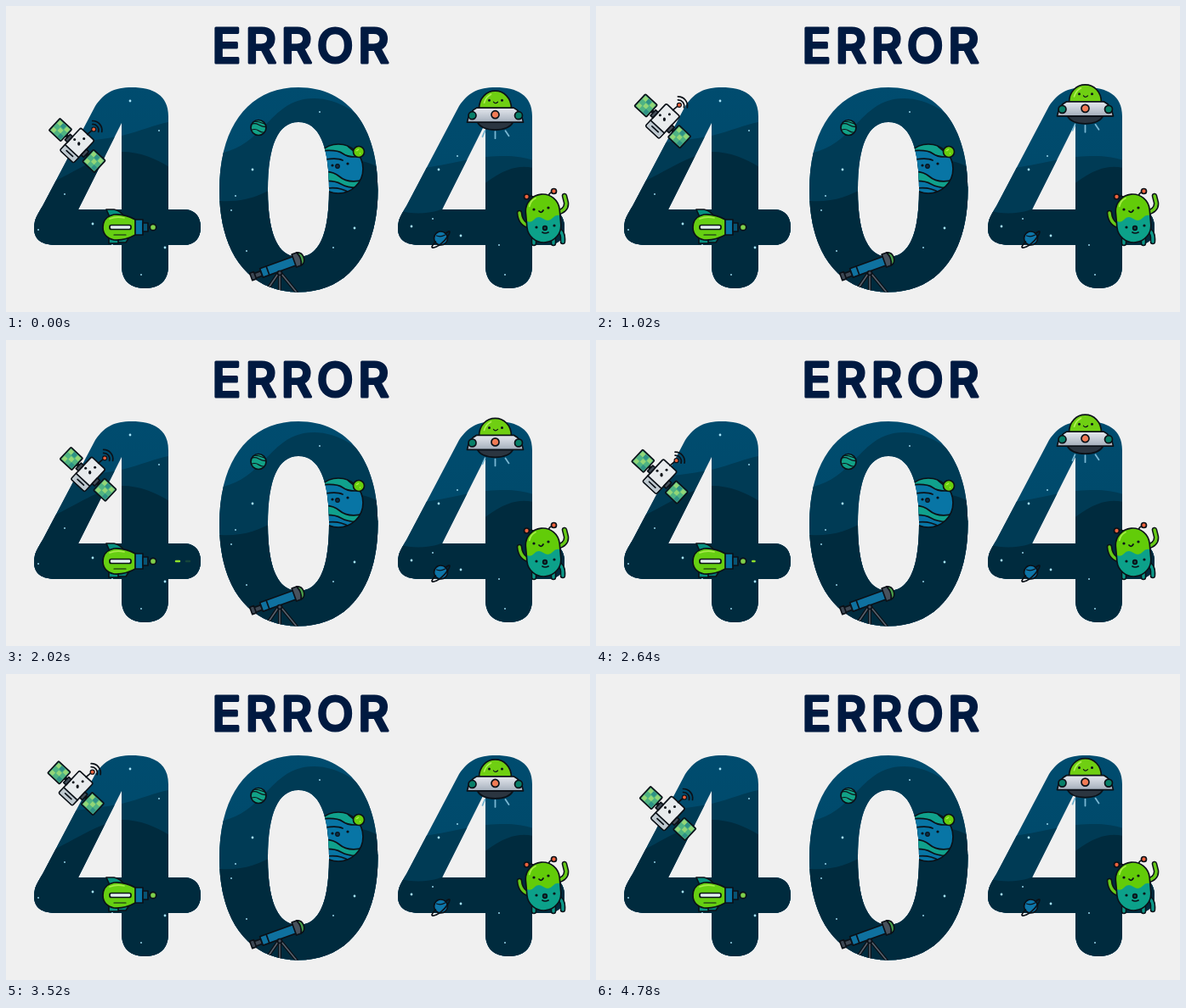
An HTML page that plays this animation: 687 by 361 pixels, repeating every 4.8 s.

```html
<!DOCTYPE html>
<html lang="en">
<head>
<meta charset="utf-8">
<title>Error 404</title>
<style>
  html, body { margin: 0; width: 100%; height: 100%; overflow: hidden; background: #f0f0f0; }
  svg { display: block; width: 100vw; height: 100vh; }
  .title { font: 500 56px Inter, "Open Sans", sans-serif; letter-spacing: 5.6px; fill: #001a41; stroke: #001a41; stroke-width: 3.2; stroke-linejoin: round; }
  .ink { stroke: #0b1118; stroke-width: 1.7; stroke-linejoin: round; stroke-linecap: round; }
  .line { fill: none; }
  .thin { stroke-width: 1.2; }
  .dot { stroke: none; fill: #0b1118; }
</style>
</head>
<body>
<svg viewBox="0 0 687 361" xmlns="http://www.w3.org/2000/svg">
  <defs>
    <path id="four" d="M148 96C173 96 191 105 191 130V240H209C222 240 229 248 229 261S222 282 209 282H191V306C191 324 181 333 163.500 333S136 324 136 306V282H60C42 282 33 276 33 262C33 252 37 246 43 236L105 118C116 102 127 96 148 96ZM136 138L85 240H136Z"/>
    <path id="zero" d="M344 96C403 96 437.500 143 437.500 217S403 337.500 344 337.500S251 291 251 217S285 96 344 96ZM344 137C320 137 308 165 308 217S320 296 344 296S380 270 380 217S368 137 344 137Z"/>
    <clipPath id="digits">
      <use href="#four" clip-rule="evenodd"/>
      <use href="#zero" clip-rule="evenodd"/>
      <use href="#four" x="428" clip-rule="evenodd"/>
    </clipPath>
    <clipPath id="zeroClip"><use href="#zero" clip-rule="evenodd"/></clipPath>
    <clipPath id="globe"><circle cx="391" cy="192" r="29"/></clipPath>
    <clipPath id="ball"><circle cx="297" cy="143.500" r="9"/></clipPath>
    <clipPath id="torso"><rect x="612" y="222" width="40" height="57" rx="20"/></clipPath>
    <linearGradient id="light" x2="0" y2="1"><stop stop-color="#004c6f"/><stop offset="1" stop-color="#004766"/></linearGradient>
    <linearGradient id="hull" x2="0" y2="1"><stop stop-color="#e6e9ef"/><stop offset="1" stop-color="#a4aebb"/></linearGradient>
    <g id="panel">
      <rect class="ink" x="-9.500" y="-9.500" width="19" height="19" rx="1" fill="#4fb383"/>
      <g stroke="none">
        <path fill="#93d677" d="M-8-8h5v5h-5zM-2 -2h5v5h-5zM3-8h5v5h-5zM-8 3h5v5h-5z"/>
        <path fill="#2f9186" d="M-3-8h5v5h-5zM3 3h5v5h-5z"/>
      </g>
    </g>
  </defs>

  <rect width="687" height="361" fill="#f0f0f0"/>
  <text class="title" x="242.500" y="66.500">ERROR</text>

  <g clip-path="url(#digits)">
    <rect y="90" width="687" height="255" fill="url(#light)"/>
    <path fill="#003b55" d="M30 165C80 162 110 158 136 153C160 147 175 140 191 137L251 174C300 165 310 118 350 110C385 104 415 125 438 150L461 192C500 194 535 181 565 178C590 176 605 177 620 182L687 190V345H30Z"/>
    <path fill="#002b3e" d="M30 218C70 205 100 178 136 172C158 172 176 180 192 190L251 230C290 232 305 220 345 198C380 178 410 176 438 190L461 241C500 252 530 236 565 208C590 190 605 188 620 191L687 210V345H30Z"/>
    <g id="stars" fill="#a5e4fa"></g>
  </g>

  <!-- planets -->
  <g clip-path="url(#ball)">
    <circle cx="297" cy="143.500" r="9" fill="#12a287"/>
    <path class="ink thin line" d="M286 141q6-4 11-1t12 3M287 147q6-3 10 0t9 2M291 136q6 0 13 3"/>
  </g>
  <circle class="ink line" cx="297" cy="143.500" r="9"/>

  <g clip-path="url(#zeroClip)">
    <g clip-path="url(#globe)">
      <circle cx="391" cy="192" r="29" fill="#0875a5"/>
      <path class="ink" fill="#10a18c" d="M362 160H398Q404 170 420 177Q404 180 396 174T362 172zM362 198Q382 192 392 201T422 205V214Q404 216 394 210T362 208z"/>
      <path class="ink line" d="M376 181q14-2 20 1M378 215q14-2 26 5"/>
    </g>
    <circle class="ink line" cx="391" cy="192" r="29"/>
    <circle class="dot" cx="384" cy="188" r="1.600"/><circle class="dot" cx="402" cy="186" r="1.600"/>
    <circle class="ink thin" cx="390" cy="189" r="2.300" fill="#07324d"/>
  </g>
  <circle class="ink" cx="415" cy="172" r="6.500" fill="#68cf0c"/>
  <path d="M412 171l3-2M416 174h1" stroke="#b3ee51" stroke-width="1.500"/>

  <g transform="translate(511.500 274)">
    <circle class="ink" r="8" fill="#0e75a8"/>
    <path class="ink thin line" d="M-5-3q5 2 10-1"/>
    <path class="ink line" d="M-6 4C-11 9-12 12-8 11C-3 10 4 4 8-2C12-8 11-10 6-6"/>
  </g>

  <!-- telescope -->
  <g class="ink" clip-path="url(#zeroClip)">
    <path class="line" d="M320 316L305 338M322 316V338M324 316L342 338" stroke-width="4"/>
    <path class="line" d="M320 316L305 338M322 316V338M324 316L342 338" style="stroke:#59636e;stroke-width:1.500"/>
  </g>
  <g class="ink">
    <g transform="translate(321 307) rotate(-20)">
      <path fill="#3e4854" d="M-35-4h5v9h-5zM-30-2h8v6h-8z"/>
      <path fill="#0f719f" d="M-22-5H20V6H-22z"/>
      <path class="line" d="M-14-5V6"/>
      <path fill="#48515c" d="M19-8h6q5 8 0 16h-6z"/>
      <path fill="#4ca24c" d="M25-8q6 1 6 8t-6 8q4-8 0-16z"/>
    </g>
    <circle cx="322" cy="315" r="2.500" fill="#48515c"/>
  </g>

  <!-- rocket -->
  <g class="ink">
    <path fill="#079080" d="M122 249L118 240H127Q134 241 140 249zM121 272V280H132L145 273z"/>
    <path fill="#087b76" d="M132 273V279H141L145 273z"/>
    <path fill="#66cf12" d="M153 252.500Q140 245 127 246Q114 249 114 261T127 276Q140 277 153 269.500Z"/>
    <path d="M122 251Q130 248 139 250" fill="none" style="stroke:#a8ea4b"/>
    <rect x="122" y="258.500" width="25" height="5" rx="2" fill="#e3f1f0"/>
    <path class="line thin" d="M127 270H141"/>
    <path fill="#0873a2" d="M152 252h9v18h-9z"/>
    <path fill="#075475" d="M161 256h6v10h-6z"/>
    <circle cx="173" cy="261" r="3.700" fill="#7fd04b"/>
  </g>
  <g id="exhaust" fill="#8fe12c"></g>

  <!-- alien -->
  <g class="ink">
    <path class="line" d="M622 227Q619 222 613 226M638 226Q638 220 644 219"/>
    <circle cx="612.500" cy="225" r="3" fill="#ef633d"/><circle cx="644.500" cy="218.500" r="3" fill="#ef633d"/>
    <g class="line">
      <path d="M648 244Q660 241 659 232L657 224M614 259Q605 256 604 244M649 264Q656 266 655 278M621 275V280M644 275V280" stroke-width="6.500"/>
      <path d="M648 244Q660 241 659 232L657 224M614 259Q605 256 604 244" style="stroke:#68ca18;stroke-width:3.400"/>
      <path d="M649 264Q656 266 655 278M621 275V280M644 275V280" style="stroke:#0b9788;stroke-width:3.400"/>
    </g>
    <g transform="rotate(-5 632 250)">
      <g clip-path="url(#torso)">
        <rect x="610" y="220" width="44" height="62" fill="#62cc09"/>
        <path fill="#0ca18a" stroke="none" d="M610 250q6 6 11 1t11 0t11 0t11-1v34h-44z"/>
      </g>
      <rect class="line" x="612" y="222" width="40" height="57" rx="20"/>
      <path class="line" d="M617 235q2-7 8-9" style="stroke:#a7ed48"/>
    </g>
    <path class="line" d="M627 242q3 3 5-1M631 267q3 2 7 0"/>
    <g class="dot"><circle cx="621" cy="240" r="1.600"/><circle cx="638" cy="238" r="1.600"/><circle cx="624" cy="261" r="1.600"/><circle cx="645" cy="259" r="1.600"/></g>
    <circle cx="634" cy="262" r="2.300" fill="#07564f"/>
  </g>

  <!-- satellite -->
  <g id="satellite">
    <g class="ink" transform="rotate(43)">
      <path class="line" d="M-20 0H20" stroke-width="4"/>
      <use href="#panel" x="-27"/>
      <use href="#panel" x="27"/>
      <rect x="-11" y="-18" width="22" height="36" rx="2" fill="#e8ebed"/>
      <path d="M-10 9H10V17H-10z" stroke="none" fill="#bec8cf"/>
      <path class="line" d="M-11 9H11M-5 13H5"/>
      <path d="M-15-4h4v9h-4zM11-4h4v9h-4z" fill="#46515c"/>
    </g>
    <g class="dot"><circle cx="-3" cy="-7" r="1.500"/><circle cx="8" cy="-8" r="1.500"/></g>
    <ellipse class="dot" cx="2" cy="-2" rx="1.600" ry="2.300"/>
    <path class="ink line" d="M12-13L19-19M18-25A7 7 0 0 1 25-16M18-29A11 11 0 0 1 29-16"/>
    <circle class="ink thin" cx="19.500" cy="-19" r="2.500" fill="#ef633d"/>
  </g>

  <!-- saucer -->
  <g id="ufo">
    <path d="M-12 17L-15 24M0 18V26M12 17L16 23" stroke="#78b6d2" stroke-width="1.800" stroke-linecap="round"/>
    <g class="ink">
      <path fill="#2b3540" d="M-21 7H21Q16 16 0 16T-21 7z"/>
      <path fill="#6fcf12" d="M-19-9C-19-22-10-30 0-30S19-22 19-9z"/>
      <path class="line" d="M-13-16q2-7 8-10" style="stroke:#b0ef55"/>
      <path fill="url(#hull)" d="M-22-10H22Q31-6 33 7H-33Q-31-6-22-10z"/>
      <circle cx="-27" cy="-1" r="4.500" fill="#087f68"/><circle cx="27.500" cy="-1" r="4.500" fill="#087f68"/>
      <circle cx="0" cy="-2" r="4.500" fill="#f07b55"/>
      <path class="line thin" d="M-2-17q2 3 5 0"/>
    </g>
    <circle class="dot" cx="-7" cy="-19" r="1.500"/><circle class="dot" cx="8" cy="-19" r="1.500"/>
  </g>
</svg>
<script>
  const byId = id => document.getElementById(id);
  const add = (parent, tag, attrs) => {
    const el = document.createElementNS('http://www.w3.org/2000/svg', tag);
    for (const key in attrs) el.setAttribute(key, attrs[key]);
    return parent.appendChild(el);
  };

  const stars = [
    [146, 112], [180, 147], [69, 222], [102, 257], [38, 264], [125, 282], [187, 285], [159, 317],
    [369, 125], [290, 193], [270, 224], [265, 241], [410, 262], [385, 285], [283, 289],
    [509, 193], [531, 177], [502, 251], [535, 271], [580, 282], [587, 317], [477, 260]
  ];
  stars.forEach(([cx, cy], i) => add(byId('stars'), 'circle', { cx, cy, r: i % 3 ? 0.9 : 1.4 }));

  const LOOP = 4800, ORBIT = 2400, BURST = 1200, BOB = 1775;
  const TURN = 2 * Math.PI;
  const clamp = v => Math.max(0, Math.min(1, v));
  const satellite = byId('satellite'), ufo = byId('ufo');
  const puffs = [0, 1, 2].map(() => add(byId('exhaust'), 'rect', { height: 2.6, rx: 1.2 }));

  function draw(t) {
    const a = TURN * t / ORBIT + 0.05;
    satellite.setAttribute('transform',
      `translate(${84.5 - 15 * Math.sin(a)} ${149.5 + 15 * Math.cos(a)})`);

    const y = 124.5 + 9.5 * Math.cos(TURN * (t / BOB + 0.147));
    ufo.setAttribute('transform', `translate(575.5 ${y})`);

    const head = 182.5 + 0.07 * (t % BURST - 200);
    puffs.forEach((puff, i) => {
      const x = head - 12 * i;
      const w = 2.6 + 3.8 * clamp((x - 182) / 6);
      puff.setAttribute('x', x - w / 2);
      puff.setAttribute('y', 259.7);
      puff.setAttribute('width', w);
      puff.setAttribute('opacity', clamp((x - 178) / 3) * clamp((216 - x) / 14));
    });
  }

  const start = performance.now();
  function tick(now) {
    draw(Math.max(0, now - start) % LOOP);
    requestAnimationFrame(tick);
  }
  draw(0);
  requestAnimationFrame(tick);
</script>
</body>
</html>
```
